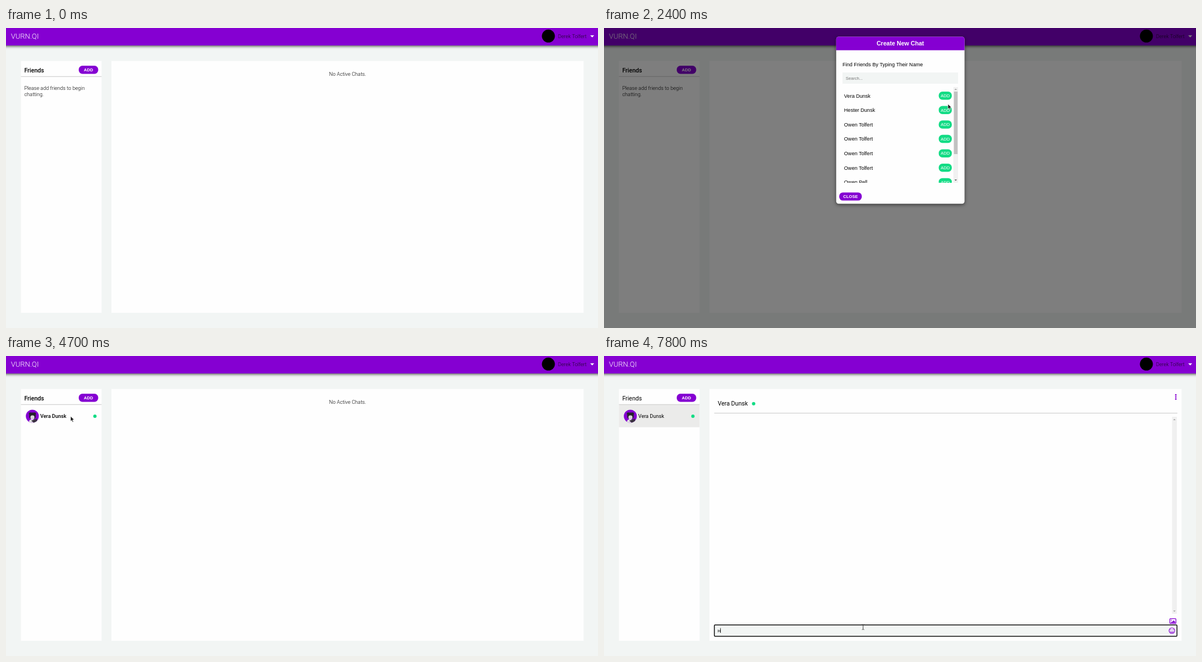
An HTML page with a canvas that plays this animation: 1050 px wide and 533 px high, repeating every 8 s.

```html
<!DOCTYPE html>
<html lang="en">
<head>
<meta charset="utf-8">
<title>Chat demo</title>
<style>
html, body { margin: 0; width: 100%; height: 100%; overflow: hidden; background: #f2f5f4; }
canvas { display: block; }
</style>
</head>
<body>
<canvas id="stage" width="1050" height="533"></canvas>
<script>
const ctx = document.getElementById('stage').getContext('2d');
const LOOP = 8000;
const PURPLE = '#8500d2', GREEN = '#13dc85', PANEL = '#fefefe', PAGE = '#f2f5f4';
const ROBOTO = 'Roboto, sans-serif', ARIAL = '"Liberation Sans", Arial, sans-serif';
const BASE = 9.07, SMALL = 7.56, HEADING = 10.6;

const BRAND = 'VURN.QI', USER = 'Derek Tolfert', FRIEND = 'Vera Dunsk';
const PEOPLE = [FRIEND, 'Hester Dunsk', ...Array(4).fill('Owen Tolfert'), 'Owen Pell'];

const AT = { modal: 1500, added: 3500, chat: 5500, focus: 7200, caretOff: 7700, typed: 7800 };

// Pointer stops: time, hot spot x and y, shape
const POINTER = [
  [400, 203, 10.5, 'arrow'], [500, 190.5, 23.5, 'arrow'],
  [700, 185, 38, 'arrow'], [800, 174, 56, 'arrow'], [900, 161, 69, 'hand'], [1000, 156, 71.5, 'hand'],
  [1900, 176, 75, 'arrow'], [2000, 235, 84, 'arrow'], [2100, 325, 98, 'arrow'],
  [2200, 430, 112, 'arrow'], [2300, 530, 125, 'arrow'], [2400, 610, 135, 'arrow'],
  [2500, 655, 141, 'arrow'], [2600, 660, 138, 'arrow'], [2700, 632, 129, 'arrow'],
  [2800, 623, 125, 'arrow'], [2900, 613, 121.5, 'hand'], [3000, 609, 120, 'hand'], [3100, 607.4, 119.5, 'hand'],
  [3900, 520, 90, 'arrow'], [4000, 375, 42, 'arrow'], [4100, 260, 34, 'arrow'], [4200, 203, 66.5, 'arrow'],
  [4400, 180, 80, 'arrow'], [4500, 145, 97, 'arrow'], [4600, 122, 106, 'arrow'], [4700, 114.5, 107, 'arrow'],
  [6500, 117, 108, 'arrow'], [6600, 190, 200, 'arrow'], [6700, 350, 380, 'arrow'],
  [6800, 465, 468, 'arrow'], [6900, 459.5, 481.5, 'beam']
];

function rect(x, y, w, h, color) {
  ctx.fillStyle = color;
  ctx.fillRect(x, y, w, h);
}

function roundRect(x, y, w, h, r, color) {
  ctx.beginPath();
  ctx.roundRect(x, y, w, h, r);
  ctx.fillStyle = color;
  ctx.fill();
}

function dot(x, y, r, color) {
  ctx.beginPath();
  ctx.arc(x, y, r, 0, Math.PI * 2);
  ctx.fillStyle = color;
  ctx.fill();
}

function polygon(points, color) {
  ctx.beginPath();
  points.forEach(([x, y]) => ctx.lineTo(x, y));
  ctx.closePath();
  ctx.fillStyle = color;
  ctx.fill();
}

function text(str, x, y, weight, size, family, color, align = 'left') {
  ctx.font = `${weight} ${size}px ${family}`;
  ctx.textAlign = align;
  ctx.fillStyle = color;
  ctx.fillText(str, x, y);
}

function withShadow(offset, blur, alpha, draw) {
  ctx.save();
  ctx.shadowColor = `rgba(0,0,0,${alpha})`;
  ctx.shadowOffsetY = offset;
  ctx.shadowBlur = blur;
  draw();
  ctx.restore();
}

function button(label, x, y, w, h, weight, color) {
  roundRect(x, y, w, h, 6.5, color);
  text(label, x + w / 2, y + h / 2 + 2.7, weight, SMALL, ARIAL, '#fff', 'center');
}

function scrollArrow(x, y, dir, color) {
  polygon([[x - 2.2, y + dir], [x + 2.2, y + dir], [x, y - dir * 1.2]], color);
}

function avatar(x, y) {
  ctx.save();
  ctx.beginPath();
  ctx.arc(x, y, 11.5, 0, Math.PI * 2);
  ctx.clip();
  rect(x - 12, y - 12, 24, 24, PURPLE);
  ctx.translate(x, y);
  dot(-4, -4.5, 2.2, '#26212c');
  dot(4.3, -4.5, 2.2, '#26212c');
  roundRect(-5.5, -6.5, 11.5, 11, 4, '#26212c');
  roundRect(-3.3, -1.5, 7, 7, 3, '#d9d5dc');
  polygon([[-7, 12], [-5, 7], [-1, 5], [3, 6], [7, 8], [8, 12]], '#e4e1e6');
  polygon([[-2, 8], [8, 4], [9, 9], [3, 12]], '#3a3042');
  ctx.restore();
}

function header() {
  withShadow(1.5, 5, 0.7, () => rect(-10, -10, 1070, 41, PURPLE));
  text(BRAND, 8.7, 18.6, 300, 13, ROBOTO, '#fff');
  dot(962, 14.3, 11.5, '#000');
  text(USER, 979, 18, 300, BASE, ROBOTO, '#1b0629');
  polygon([[1036.2, 13], [1043.2, 13], [1039.7, 16.8]], '#fff');
}

function sidebar(t) {
  const weight = t >= AT.chat ? 400 : 500;
  rect(26.5, 58.5, 143, 447.5, PANEL);
  if (t >= AT.chat) rect(26.5, 86.5, 143, 40, '#ebebea');
  rect(26.5, 85.7, 143, 1, '#c8c8c8');
  text('Friends', 32.4, 78.5, weight, HEADING, ROBOTO, '#000');
  button('ADD', 129, 67, 34.5, 14.5, 700, PURPLE);
  if (t < AT.added) {
    text('Please add friends to begin', 32.4, 110.4, 300, BASE, ROBOTO, '#000');
    text('chatting.', 32.4, 121.3, 300, BASE, ROBOTO, '#000');
  } else {
    avatar(46.7, 107);
    text(FRIEND, 60.8, 110.4, weight, BASE, ROBOTO, '#000');
    dot(157.7, 107, 3, GREEN);
  }
}

function pictureIcon() {
  ctx.strokeStyle = PURPLE;
  ctx.lineWidth = 1.3;
  ctx.beginPath();
  ctx.roundRect(1003.6, 466.6, 10.8, 8.8, 1.2);
  ctx.stroke();
  dot(1006.3, 469.3, 0.9, PURPLE);
  polygon([[1004.8, 474.2], [1006.8, 471.8], [1007.8, 472.6], [1010.4, 469.6], [1013.2, 472.8], [1013.2, 474.2]], PURPLE);
}

function smileIcon(x, y) {
  ctx.strokeStyle = PURPLE;
  ctx.lineWidth = 1.2;
  ctx.beginPath();
  ctx.arc(x, y, 5, 0, Math.PI * 2);
  ctx.stroke();
  ctx.beginPath();
  ctx.arc(x, y + 0.3, 2.6, 0.35, Math.PI - 0.35);
  ctx.stroke();
  dot(x - 1.8, y - 1.4, 0.8, PURPLE);
  dot(x + 1.8, y - 1.4, 0.8, PURPLE);
}

function messageBox(t) {
  rect(196, 478, 820, 19.5, PAGE);
  if (t >= AT.focus) {
    ctx.strokeStyle = '#101010';
    ctx.lineWidth = 1.5;
    ctx.beginPath();
    ctx.roundRect(195.7, 477.7, 820.6, 20.3, 1.5);
    ctx.stroke();
    const typed = t >= AT.typed;
    if (typed) text('H', 201.4, 490.8, 400, SMALL, ARIAL, '#000');
    if (typed || t < AT.caretOff) rect(typed ? 206.3 : 201.5, 483.3, 0.8, 8.7, '#000');
  }
  smileIcon(1007.3, 488);
}

function chatPanel(t) {
  rect(187, 58.5, 837.5, 447.5, PANEL);
  if (t < AT.chat) {
    text('No Active Chats.', 605.8, 84.8, 300, BASE, ROBOTO, '#000', 'center');
    return;
  }
  text(FRIEND, 201.7, 88.2, 400, HEADING, ROBOTO, '#000');
  dot(265.4, 84.8, 3, GREEN);
  [69.2, 72.8, 76.4].forEach(y => dot(1014.2, y, 1.4, PURPLE));
  rect(195.5, 101, 821.5, 1, '#c8c8c8');
  rect(1007.5, 108, 8.5, 350, '#f0f0f0');
  scrollArrow(1011.7, 113, 1, '#a3a3a3');
  scrollArrow(1011.7, 453.3, -1, '#a3a3a3');
  pictureIcon();
  messageBox(t);
}

function modal(overThumb) {
  rect(0, 0, 1050, 533, 'rgba(0,0,0,0.5)');
  withShadow(1.5, 6, 0.6, () => roundRect(411.8, 15.5, 227.7, 296.7, 4.5, PANEL));
  roundRect(411.8, 15.5, 227.7, 24, [4.5, 4.5, 0, 0], PURPLE);
  text('Create New Chat', 525.5, 30.8, 700, HEADING, ARIAL, '#fff', 'center');
  text('Find Friends By Typing Their Name', 423, 67.6, 400, BASE, ARIAL, '#000');
  rect(423, 79, 205, 20, PAGE);
  text('Search...', 428.7, 91.7, 400, SMALL, ARIAL, '#757575');

  ctx.save();
  ctx.beginPath();
  ctx.rect(423, 105, 205, 170);
  ctx.clip();
  PEOPLE.forEach((name, i) => {
    const y = 120.2 + i * 25.62;
    text(name, 425.8, y + 3.3, 400, BASE, ARIAL, '#000');
    button('ADD', 593.7, y - 7.2, 23.2, 14.4, 400, GREEN);
  });
  rect(619.7, 105, 8.3, 170, '#f1f1f1');
  rect(620.7, 113, 6.4, 111, overThumb ? '#a8a8a8' : '#c1c1c1');
  scrollArrow(623.8, 109, 1, '#a3a3a3');
  scrollArrow(623.8, 270.3, -1, '#505050');
  ctx.restore();

  button('CLOSE', 417.2, 292.2, 40, 14.4, 700, PURPLE);
}

const SHAPES = {
  arrow: {
    path: new Path2D('M0 0L0 9L2.1 7.2L3.6 10.4L5.1 9.7L3.7 6.6L6.4 6.3Z'),
    fill: '#1c1c1c', stroke: '#fff', width: 0.7
  },
  hand: {
    path: new Path2D('M-.8 7V1.5Q-.8.6 0 .6Q.8.6.8 1.5V4.4L5 5Q6.2 5.3 6.2 6.3L5.8 8.8L4.8 10.9H.4L-2.8 7.6Q-3.2 6.3-2 6.3Z'),
    fill: '#fff', stroke: '#222', width: 0.9
  },
  beam: {
    path: new Path2D('M-2-4.5H-.5L0-4L.5-4.5H2M0-4V4M-2 4.5H-.5L0 4L.5 4.5H2'),
    fill: 'transparent', stroke: '#333', width: 0.9
  }
};

function drawPointer([, x, y, kind]) {
  const shape = SHAPES[kind];
  ctx.save();
  ctx.translate(x, y);
  ctx.lineJoin = 'round';
  ctx.lineWidth = shape.width;
  ctx.fillStyle = shape.fill;
  ctx.strokeStyle = shape.stroke;
  ctx.fill(shape.path);
  ctx.stroke(shape.path);
  ctx.restore();
}

function draw(t) {
  const pointer = POINTER.findLast(stop => stop[0] <= t);
  rect(0, 0, 1050, 533, PAGE);
  header();
  sidebar(t);
  chatPanel(t);
  if (t >= AT.modal && t < AT.added) {
    modal(pointer[1] >= 620 && pointer[1] <= 628);
  }
  if (pointer) drawPointer(pointer);
}

const start = performance.now();
function tick() {
  draw((performance.now() - start) % LOOP);
  requestAnimationFrame(tick);
}
tick();
</script>
</body>
</html>
```
